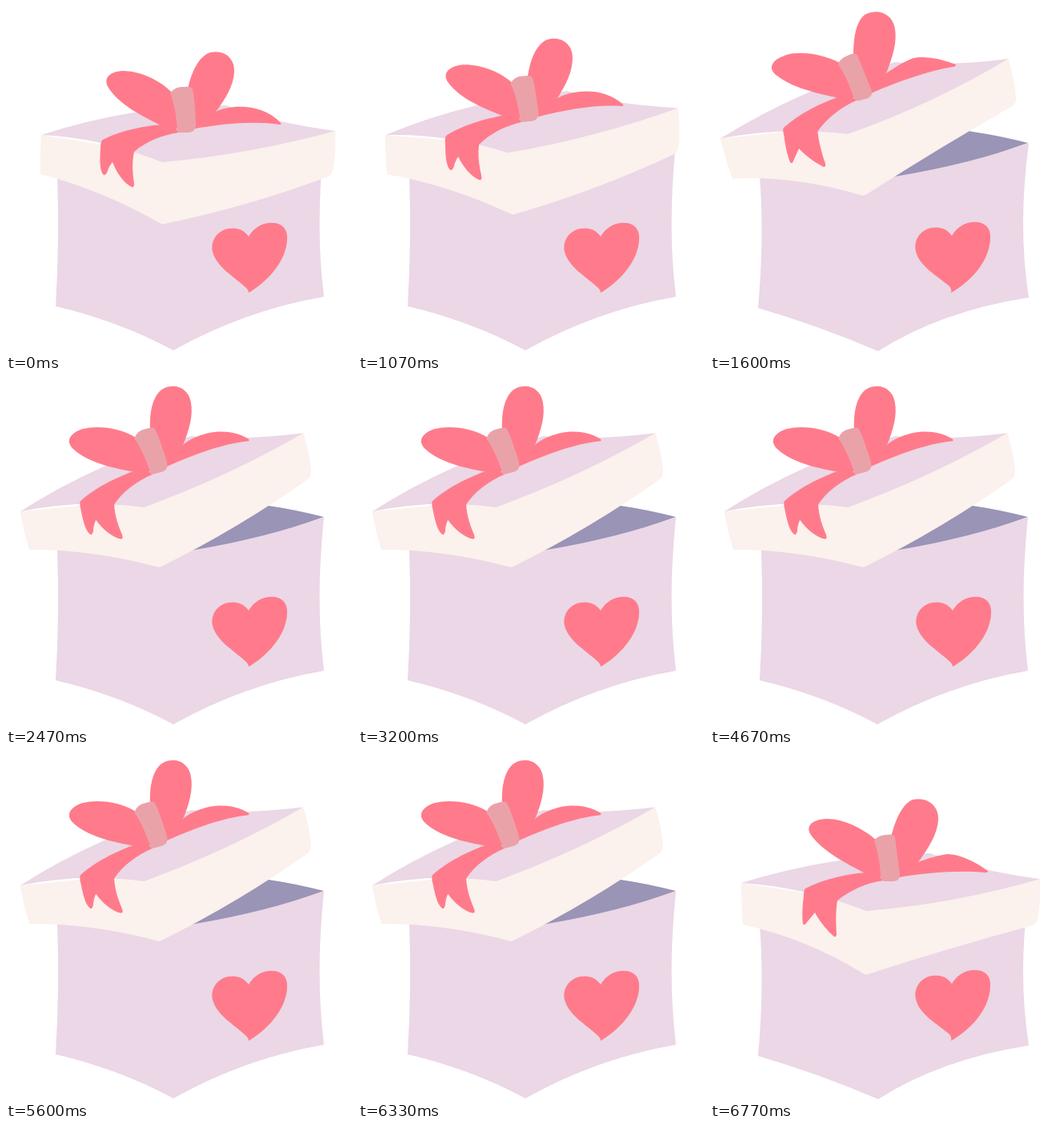
Write an HTML page that moves like this. It is 432 px wide and 432 px high and loops after 6.81 s.

```html
<!DOCTYPE html>
<html lang="en">
<head>
<meta charset="utf-8">
<title>Gift box</title>
<style>
  html, body { margin: 0; width: 100%; height: 100%; overflow: hidden; background: #fff; }
  svg { display: block; width: 100vw; height: 100vh; }
  .side { fill: #ebd7e6; }
  .rim { fill: #fbf1ed; }
  .inside { fill: #9a94b6; }
  .ribbon { fill: #ff7b8b; }
  .knot { fill: #eaa2a9; }
  svg.alt .a, svg:not(.alt) .b { display: none; }
</style>
</head>
<body>
<svg id="stage" viewBox="0 0 432 432">
  <path class="inside" d="M397 171 Q362 162 328 157 L240 140 L66 214 L209 236 Z"/>

  <g class="a">
    <path class="side" d="M64 212 L200 219 L236 212 Q325 197 397 171 Q386 275 397 363 Q298 380 209 430 Q140 393 62 375 Q67 290 64 212Z"/>
    <path class="ribbon" d="M303 288 C297 279 288 276 277 278 C263 281 255 294 258 307 C263 326 285 338 300 352 Q303 355 303 358 C325 345 350 320 351 291 C352 276 342 269 327 271 C314 273 307 281 303 288Z"/>
  </g>
  <g class="b">
    <path class="side" d="M62 212 L200 219 L236 212 Q325 197 398 171 Q384 275 398 364 Q288 381 210 431 Q138 400 60 377 Q68 290 62 212Z"/>
    <path class="ribbon" d="M302 287 C296 278 287 275 276 277 C262 280 254 293 257 306 C261 325 284 337 299 350 Q302 354 301 358 C324 345 349 320 350 290 C351 275 341 268 326 270 C313 272 306 280 302 287Z"/>
  </g>

  <g id="lid">
    <g class="a">
      <path class="rim" d="M44 161 L195 185 L411 156 Q412 186 408 205 Q406 211 402 213 Q304 250 198 272 Q195 273 192 271 Q118 229 43 210 Q42 185 44 161Z"/>
      <path class="side" d="M44 161 Q155 124.5 275 124 Q330 145 411 156 Q305 185 195 195 Q118 164 44 161Z"/>
      <path class="ribbon" d="M236 138 L262 132 C280 123 320 121 343 146 Q344 148 342 148 C310 143 270 147 236 153Z"/>
      <path class="ribbon" d="M207 147 C170 149 140 157 121 167 Q118 168 118 178 C117 192 117 204 121 210 Q123 213 126 208 Q129 199 133 195 C138 208 147 221 157 226 Q160 227 160 222 C158 208 157 195 160 182 C175 169 195 161 216 158Z"/>
      <path class="ribbon" d="M207 108 C192 92 166 81 146 81 C128 82 121 91 128 102 C140 122 170 138 194 149 L216 154Z"/>
      <path class="ribbon" d="M227 104 C231 84 240 63 255 58 C274 54 286 67 285 82 C284 100 274 116 262 132 L236 153Z"/>
      <path class="knot" d="M205 109 Q211 100 222 101 Q231 100 233 104 Q236 118 237 150 Q236 157 228 158 L214 158 Q212 125 205 109Z"/>
    </g>
    <g class="b">
      <path class="rim" d="M39 161 L195 185 L412 156 Q413 186 409 206 Q408 211 403 214 Q302 241 197 275 Q194 276 191 274 Q122 231 41 213 Q39 187 39 161Z"/>
      <path class="side" d="M39 161 Q155 125 275 124 Q330 145 412 156 Q305 187 195 196 Q118 166 39 161Z"/>
      <path class="ribbon" d="M236 139 L260 135 C270 131 286 126 297 125 C312 125 332 135 347 146 Q347 148 344 148 C312 145 270 148 236 154Z"/>
      <path class="ribbon" d="M207 147 C170 149 140 157 119 168 Q117 169 117 178 C115 192 115 204 116 212 Q118 215 121 210 L131 198 C138 211 147 221 155 228 Q158 229 158 224 C157 208 157 195 159 183 C175 170 195 161 216 158Z"/>
      <path class="ribbon" d="M207 107 C190 92 164 80 145 81 C126 82 119 91 126 101 C140 121 170 137 194 149 L216 154Z"/>
      <path class="ribbon" d="M226 104 C231 84 239 63 253 57 C273 53 286 66 285 82 C284 100 273 117 260 135 L236 154Z"/>
      <path class="knot" d="M205 108 Q209 102 219 101 Q230 99 231 104 L237 151 Q237 158 229 159 L217 159 Q213 158 213 150 Q211 124 205 108Z"/>
    </g>
  </g>
</svg>
<script>
  const LOOP = 6810, CYCLE = 3400, TICK = 100 / 3, LAST = 101;
  const OPEN_ANGLE = 14.7;
  const stage = document.getElementById('stage');
  const lid = document.getElementById('lid');

  const clamp = x => Math.min(1, Math.max(0, x));
  const ease = t => 0.64 * t + 0.36 * t * t * (3 - 2 * t);
  const ramp = (n, from, to) => ease(clamp((n - from) / (to - from)));

  // The drawing alternates between two poses every 3.6 ticks.
  const isAlt = n => Math.floor((n < 30 ? n : n - 1.1) / 3.6) % 2 === 1;

  function draw(now) {
    const t = now % LOOP;
    const u = t < CYCLE ? t : t - CYCLE;
    const n = Math.min(LAST, Math.floor((u + 5) / TICK));
    const open = ramp(n, 30, 36) - ramp(n, 96, 101);
    const shift = -2.4 * Math.sin(Math.PI * open);

    stage.classList.toggle('alt', isAlt(n));
    lid.setAttribute('transform',
      `translate(${shift} 0) rotate(${-OPEN_ANGLE * open} 43.7 265)`);
  }

  const start = performance.now();
  function loop() {
    draw(performance.now() - start);
    requestAnimationFrame(loop);
  }
  loop();
</script>
</body>
</html>
```
